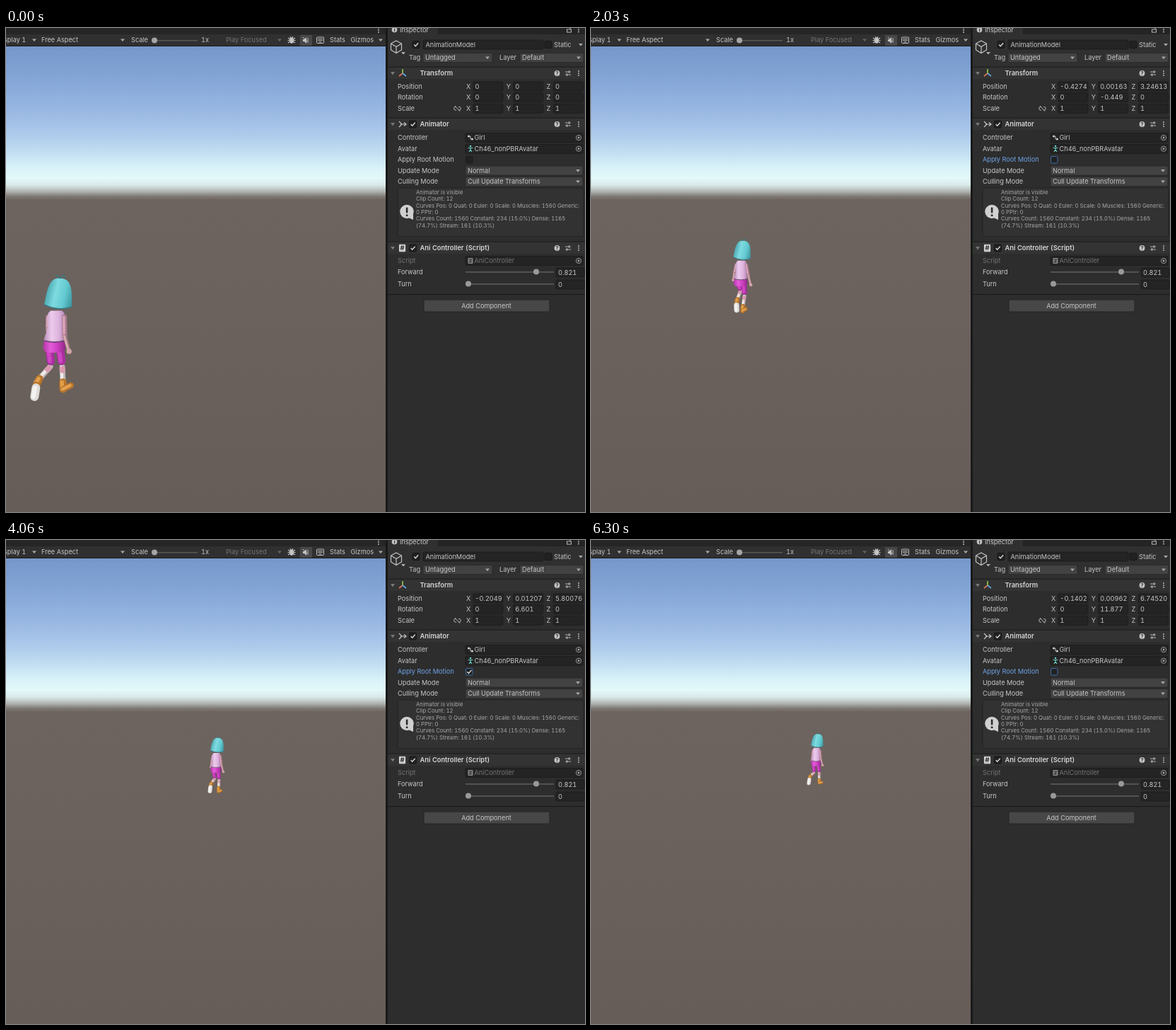
An HTML page with a canvas that plays this animation: 819 by 684 pixels, repeating every 6.37 s.

```html
<!DOCTYPE html>
<html lang="en">
<head>
<meta charset="utf-8">
<title>Root motion demo</title>
<style>
  html, body { margin: 0; width: 819px; height: 684px; overflow: hidden; background: #2d2d2d; }
  canvas, #ui { position: absolute; left: 0; top: 0; }
  canvas {
    background: linear-gradient(#6b635e 0, #6b635e 26px, #7597c9 26px, #83a5d6 70px, #98b7e2 115px, #adcaeb 150px,
      #c4e0f2 178px, #d9f2f8 197px, #e3f9fa 212px, #d9e8e8 222px, #b0b4b1 231px, #7f7975 238px, #6d645f 243px,
      #6b625d 400px, #665d58 684px);
  }
  text { font: 9.2px Inter, "Liberation Sans", sans-serif; font-variant-numeric: tabular-nums; fill: #c6c6c6; }
  .small { font-size: 7.75px; fill: #a9a9a9; }
  .bold { font-weight: 600; font-size: 9.3px; fill: #d6d6d6; }
  .dim { fill: #747474; }
</style>
</head>
<body>
<canvas width="538" height="684"></canvas>
<svg id="ui" width="819" height="684" viewBox="0 0 819 684"></svg>
<script>
const LOOP = 6370, STEP = 70;
const ui = document.getElementById('ui');

// ---------- editor interface ----------
const parts = [];
const add = (...s) => parts.push(...s);
const rect = (x, y, w, h, fill, extra = '') =>
  add(`<rect x="${x}" y="${y}" width="${w}" height="${h}" fill="${fill}" ${extra}/>`);
const path = (d, color = '#b8b8b8', w = 1, fill = 'none') =>
  add(`<path d="${d}" fill="${fill}" stroke="${color}" stroke-width="${w}"/>`);
const shape = (d, fill) => path(d, 'none', 0, fill);
const dot = (x, y, r, fill, extra = '') =>
  add(`<circle cx="${x}" cy="${y}" r="${r}" fill="${fill}" ${extra}/>`);
const text = (x, y, s, cls = '', extra = '') =>
  add(`<text x="${x}" y="${y + 3.3}" class="${cls}" ${extra}>${s}</text>`);
const arrow = (x, y, color = '#aaa') => shape(`M${x - 3} ${y - 1.5}h6l-3 3.5z`, color);
const more = (x, y) => [-3, 0, 3].forEach(d => dot(x, y + d, 0.9, '#c4c4c4'));
const tick = (x, y) => `M${x - 2.8} ${y}l2 2.3 4-4.6`;

function checkbox(x, y, on) {
  rect(x - 5, y - 5, 10, 10, '#212121', 'rx="1.5" stroke="#171717"');
  if (on) path(tick(x, y), '#d8d8d8', 1.4);
}
function box(x, y, w, h = 13) {
  rect(x, y - h / 2, w, h, '#242424', 'rx="1.5" stroke="#1b1b1b" stroke-width=".8"');
}
function field(x, y, w, id, value) {
  box(x, y, w);
  add(`<svg x="${x}" y="${y - 7}" width="${w - 1.5}" height="14"><text id="${id}" x="2.5" y="10.3">${value}</text></svg>`);
}
function dropdown(x, y, w, label) {
  rect(x, y - 6.5, w, 13, '#424242', 'rx="1.5" stroke="#272727" stroke-width=".8"');
  text(x + 3, y, label);
  arrow(x + w - 7, y);
}
function objectField(y, label, cls) {
  box(650, y, 166);
  text(662.5, y, label, cls);
  dot(810, y, 3.6, 'none', 'stroke="#a5a5a5" stroke-width=".9"');
  dot(810, y, 1.4, '#a5a5a5');
}
function header(y, title) {
  rect(540, y - 9, 279, 17, '#333');
  rect(540, y - 9.5, 279, 1, '#1b1b1b');
  shape(`M544 ${y - 2}h6l-3 4.5z`, '#777');
  text(585.5, y, title, 'bold');
  dot(779.5, y, 3.9, '#c4c4c4');
  add(`<text x="777.5" y="${y + 2.6}" style="font-size:7px;font-weight:700;fill:#333">?</text>`);
  path(`M791 ${y - 2}h8M791 ${y + 2}h8M796.5 ${y - 4}v4M793.5 ${y}v4`);
  more(810, y);
}
function slider(y, knob, value) {
  rect(650, y - 0.9, 125, 1.6, '#5c5c5c');
  dot(knob, y - 0.5, 4, '#999');
  box(778, y + 0.5, 40);
  text(781, y + 0.5, value);
}
function scriptIcon(x, y, r, color) {
  rect(x - r, y - r * 1.15, r * 2, r * 2.3, color, 'rx="1"');
  add(`<text x="${x - r * .65}" y="${y + r * .75}" style="font-size:${r * 2}px;font-weight:700;fill:#303030">#</text>`);
}

function toolbar() {
  rect(0, 0, 538, 26, '#303030');
  rect(0, 0, 538, 9, '#262626');
  rect(0, 25, 538, 1, '#1c1c1c');
  more(527, 3);
  text(-3, 17, 'splay 1'); arrow(40, 17);
  text(50, 17, 'Free Aspect'); arrow(165, 17);
  text(177, 17, 'Scale');
  rect(206, 17, 65, 1.3, '#5c5c5c'); dot(210, 17.5, 4, '#a5a5a5');
  text(276, 17, '1x');
  text(311, 17, 'Play Focused', 'dim'); arrow(387, 17, '#666');
  add('<ellipse cx="404" cy="17.5" rx="3" ry="4.3" fill="#c4c4c4"/>');
  path('M399 14l10 7M409 14l-10 7M398.5 17.5h11M402 12l1 2M406 12l-1 2', '#c4c4c4', 1.1);
  rect(416, 10, 17, 15, '#484848');
  shape('M420 16h2l3-3v9l-3-3h-2z', '#c4c4c4');
  path('M420 13l8 8M427 14v5', '#c4c4c4');
  rect(439.5, 13, 10, 8.5, 'none', 'stroke="#c4c4c4" rx="1"');
  path('M441 15.5h7M441 17.5h7M442.5 19.7h4', '#c4c4c4', 0.9);
  text(458, 17, 'Stats');
  text(487.5, 17, 'Gizmos'); arrow(530, 17);
}

function inspector() {
  rect(538, 0, 281, 684, '#2d2d2d');
  rect(537, 0, 3, 684, '#191919');
  rect(540, 0, 279, 9, '#242424');
  rect(540, 0, 71, 55, '#303030');
  rect(540, 9, 279, 46, '#303030');
  dot(549.5, 2.5, 3.8, '#c4c4c4'); rect(549, 1, 1.2, 4, '#333');
  text(557, 2.5, 'Inspector');
  rect(793.5, 2, 6, 4, 'none', 'stroke="#b8b8b8"'); path('M798 2v-3');
  more(810, 2.5);

  path('M552 18l7.5 4v9l-7.5 4.5-7.5-4.5v-9zM544.5 22l7.5 4.5 7.5-4.5M552 26.5v9', '#c4c4c4', 1.2);
  arrow(562, 35.5);
  checkbox(580, 23.5, true);
  box(590, 23.5, 170); text(593.5, 23.5, 'AnimationModel');
  checkbox(767, 23.5, false); text(775, 23.5, 'Static'); arrow(813, 23.5);
  text(570, 42, 'Tag'); dropdown(590, 42, 98, 'Untagged');
  text(698, 42, 'Layer'); dropdown(727, 42, 90, 'Default');

  header(64, 'Transform');
  path('M561 64v-6', '#8fc84a', 1.7); path('M561 64l-5 4', '#e0745a', 1.7); path('M561 64l5 4', '#5aa9dd', 1.7);
  ['Position', 'Rotation', 'Scale'].forEach((name, row) => {
    const y = 82.5 + row * 15.6;
    text(554, y, name);
    ['X', 'Y', 'Z'].forEach((axis, col) => {
      const x = 661 + col * 56.7;
      text(x - 10, y, axis);
      field(x, y, 42, name[0] + axis, row < 2 ? 0 : 1);
    });
  });
  path('M637 111.5h-1a2.3 2.3 0 0 0 0 4.6h1M640 111.5h1a2.3 2.3 0 0 1 0 4.6h-1M635 110l7 7.5');

  header(136, 'Animator');
  path('M556 132l4 4-4 4M558 136h7M563 133.5l3 2.5-3 2.5', '#c4c4c4', 1.2);
  checkbox(575.5, 136, true);
  text(554, 155, 'Controller'); objectField(155, 'Girl');
  path('M654 153h3v4h3', '#bbb'); dot(654.5, 153, 1.5, '#ccc'); dot(659.5, 157, 1.5, '#ccc');
  text(554, 170.7, 'Avatar'); objectField(170.7, 'Ch46_nonPBRAvatar');
  dot(657, 167, 1.3, '#6cd0c4'); path('M653.5 169.5h7M657 169v3l-2 3M657 172l2 3', '#6cd0c4', 1.2);
  text(554, 186, 'Apply Root Motion', '', 'id="label"');
  rect(650.5, 181.5, 9.5, 9.5, '#222', 'rx="1.5" stroke="#1b1b1b" id="toggle"');
  add(`<path id="tick" d="${tick(655.2, 186.2)}" fill="none" stroke="#dedede" stroke-width="1.4"/>`);
  text(554, 201.5, 'Update Mode'); dropdown(650, 201.5, 166, 'Normal');
  text(554, 217, 'Culling Mode'); dropdown(650, 217, 166, 'Cull Update Transforms');

  rect(554, 226, 263, 68.5, '#323232', 'rx="2" stroke="#222"');
  dot(567, 259.5, 9.7, '#d0d0d0'); shape('M569 268l7-5v8z', '#d0d0d0');
  rect(565.8, 253.5, 2.6, 8, '#2d2d2d', 'rx="1"'); dot(567.1, 264.8, 1.5, '#2d2d2d');
  ['Animator is visible', 'Clip Count: 12',
   'Curves Pos: 0 Quat: 0 Euler: 0 Scale: 0 Muscles: 1560 Generic:', '0 PPtr: 0',
   'Curves Count: 1560 Constant: 234 (15.0%) Dense: 1165', '(74.7%) Stream: 161 (10.3%)'
  ].forEach((line, i) => text(580, 231.7 + i * 9.35, line, 'small'));

  header(311, 'Ani Controller (Script)');
  scriptIcon(560.5, 311, 4.6, '#d0d0d0');
  checkbox(575.5, 311, true);
  text(554, 329, 'Script', 'dim'); objectField(329, 'AniController', 'dim');
  scriptIcon(657, 329, 3.5, '#858585');
  text(554, 345, 'Forward'); slider(345, 750, '0.821');
  text(554, 362, 'Turn'); slider(362, 654, '0');
  rect(540, 376, 279, 1.2, '#1b1b1b');
  rect(591, 384, 178, 17, '#474747', 'rx="2" stroke="#242424"');
  text(679.5, 392.5, 'Add Component', '', 'text-anchor="middle"');
}

toolbar();
inspector();
ui.innerHTML = parts.join('');
const $ = id => document.getElementById(id);

// ---------- motion ----------
// time, x, y, z, heading
const track = [
  [140, 0, 0, 0, 0],
  [840, -0.24461, 0.008312, 1.766199, -2.553],
  [1560, -0.42743, 0.001632, 3.246132, -0.449],
  [2815, -0.42743, 0.001632, 3.246132, -0.449],
  [2940, -0.41852, 0.013231, 3.500231, 9.17],
  [4060, -0.20493, 0.012071, 5.800761, 6.601],
  [4520, -0.14027, 0.009621, 6.745202, 11.877]
];
// time, run cycles completed
const strides = [[0, 0], [840, 1.05], [2030, 3.13], [2940, 4.73], [4060, 6.05], [4970, 7.82], [6300, 10]];

function sample(keys, t) {
  let i = 0;
  while (i < keys.length - 2 && t > keys[i + 1][0]) i++;
  const a = keys[i], b = keys[i + 1];
  const u = Math.min(1, Math.max(0, (t - a[0]) / (b[0] - a[0])));
  return a.slice(1).map((v, k) => v + (b[k + 1] - v) * u);
}

// closed Catmull-Rom curve through evenly spaced values
function cycle(v, p) {
  const n = v.length, f = (p - Math.floor(p)) * n, i = Math.floor(f), u = f - i;
  const [a, b, c, d] = [-1, 0, 1, 2].map(k => v[(i + k + n) % n]);
  return b + u / 2 * (c - a + u * (2 * a - 5 * b + 4 * c - d + u * (3 * (b - c) + d - a)));
}
const ankleZ = [-33, -13, 12, 24, -1, -14, -27, -39];
const ankleY = [30, 24, 18, 12, 8, 8, 9, 18];
const footPitch = [-100, -78, -30, 5, -5, 0, -22, -65];

// ---------- runner ----------
const ctx = document.querySelector('canvas').getContext('2d');
ctx.lineCap = ctx.lineJoin = 'round';

function runner(x, z, heading, phase) {
  const s = 5.34 / (5.34 + z);
  const rootX = 528 + s * (120 * x - 454), rootY = 211 + 303 * s;
  const fx = 0.71 * s + Math.sin(heading * Math.PI / 180), fy = 0.49 * s;
  const bob = 1.5 * Math.cos(4 * Math.PI * phase);
  const at = (px, py, pz) => [rootX + s * (px + fx * pz), rootY - s * (py + fy * pz)];
  const mix = (a, b, u) => a.map((v, i) => v + (b[i] - v) * u);

  function line(a, b, w, color) {
    ctx.strokeStyle = color;
    ctx.lineWidth = w * s;
    ctx.beginPath(); ctx.moveTo(...a); ctx.lineTo(...b); ctx.stroke();
  }
  function limb(a, b, w, dark, light) {
    line(a, b, w, dark);
    const shift = ([u, v]) => [u - w * s * 0.12, v];
    line(shift(a), shift(b), w * 0.5, light);
  }
  function across(c, half, ...stops) {
    const g = ctx.createLinearGradient(c[0] - half * s, 0, c[0] + half * s, 0);
    stops.forEach((color, i) => g.addColorStop(i / (stops.length - 1), color));
    return g;
  }

  function leg(side, p) {
    const az = cycle(ankleZ, p), ay = cycle(ankleY, p), hx = 7.5 * side, hy = 66 + bob, hz = -8;
    const dist = Math.min(59.9, Math.hypot(az - hz, ay - hy));
    const bend = Math.acos((29 * 29 + dist * dist - 31 * 31) / (58 * dist));
    const ang = Math.atan2(ay - hy, az - hz) + bend;
    const hip = at(hx, hy, hz), ankle = at(hx, ay, az);
    const knee = at(hx, hy + 29 * Math.sin(ang), hz + 29 * Math.cos(ang));
    const deg = cycle(footPitch, p), r = deg * Math.PI / 180;
    const toe = at(hx + side, ay - 4 + 16 * Math.sin(r), az + 14 * Math.cos(r));
    const heel = at(hx, ay - 4, az);
    limb(mix(knee, ankle, 0.08), ankle, 8, '#bdb5b3', '#f1eeec');
    line(mix(knee, ankle, 0.18), mix(knee, ankle, 0.24), 8, '#d99ab0');
    limb(hip, mix(hip, knee, 0.78), 11.5, '#a82f9e', '#cf45c3');
    limb(mix(knee, ankle, 0.8), heel, 10.5, '#b8742c', '#e0a04c');
    limb(heel, toe, 8.5, '#b8742c', '#e2a250');
    const sole = Math.min(1, Math.max(0, (-deg - 50) / 25));
    if (sole) {
      ctx.globalAlpha = sole;
      limb(mix(heel, toe, 0.25), toe, 12, '#dedbd8', '#f3f2f0');
      ctx.globalAlpha = 1;
    }
  }

  const swing = 10 * Math.cos(2 * Math.PI * phase);
  function arm(side) {
    const z0 = -side * swing;
    const shoulder = at(11.5 * side, 106 + bob, -4);
    const elbow = at(19 * side, 84 + bob, z0 - 4);
    const hand = at(23 * side, 61 + bob + Math.max(0, z0), z0 * 1.1);
    limb(shoulder, elbow, 7, '#a9788c', '#d6a6b8');
    limb(elbow, hand, 5.5, '#a77b85', '#d9adb3');
    line(hand, hand, 7.5, '#d0a3a8');
  }

  const sides = [{ side: -1, p: phase }, { side: 1, p: phase + 0.5 }];
  sides.sort((a, b) => cycle(ankleZ, b.p) - cycle(ankleZ, a.p)).forEach(l => leg(l.side, l.p));
  const farArm = swing > 0 ? -1 : 1;
  arm(farArm);

  const waist = at(0, 75 + bob, -8), chest = at(0, 111 + bob, -4);
  const hips = at(0, 63 + bob, -8);
  ctx.fillStyle = across(hips, 16, '#b136a7', '#e35bd8', '#c93dbd', '#8e2884');
  ctx.beginPath();
  ctx.moveTo(waist[0] - 14 * s, waist[1]);
  ctx.quadraticCurveTo(hips[0] - 18 * s, hips[1], hips[0] - 13 * s, hips[1] + 4 * s);
  ctx.quadraticCurveTo(hips[0], hips[1] + 7 * s, hips[0] + 13 * s, hips[1] + 4 * s);
  ctx.quadraticCurveTo(hips[0] + 18 * s, hips[1], waist[0] + 14 * s, waist[1]);
  ctx.fill();

  ctx.fillStyle = across(mix(waist, chest, 0.5), 16, '#b98dbc', '#edcbed', '#dcb2dd', '#a677a9');
  ctx.beginPath();
  ctx.moveTo(chest[0] - 8 * s, chest[1] - 4 * s);
  ctx.quadraticCurveTo(chest[0] - 15 * s, chest[1], chest[0] - 12 * s, chest[1] + 14 * s);
  ctx.quadraticCurveTo(chest[0] - 12 * s, waist[1] - 12 * s, waist[0] - 15.5 * s, waist[1]);
  ctx.quadraticCurveTo(waist[0], waist[1] + 5 * s, waist[0] + 15.5 * s, waist[1]);
  ctx.quadraticCurveTo(chest[0] + 11 * s, waist[1] - 12 * s, chest[0] + 12 * s, chest[1] + 14 * s);
  ctx.quadraticCurveTo(chest[0] + 15 * s, chest[1], chest[0] + 8 * s, chest[1] - 4 * s);
  ctx.fill();
  ctx.strokeStyle = '#6d4a6d';
  ctx.lineWidth = 1.6 * s;
  ctx.beginPath();
  ctx.moveTo(waist[0] - 15 * s, waist[1]);
  ctx.quadraticCurveTo(waist[0], waist[1] + 5 * s, waist[0] + 15 * s, waist[1]);
  ctx.stroke();
  arm(-farArm);

  const head = at(0, 119 + bob, 0);
  ctx.save();
  ctx.translate(...head);
  ctx.scale(s, s);
  ctx.rotate(0.08);
  const g = ctx.createLinearGradient(-20, -12, 20, -6);
  ['#4ba7af', '#7edbe0', '#63c9d0', '#3a929c'].forEach((c, i) => g.addColorStop(i / 3, c));
  ctx.fillStyle = g;
  ctx.beginPath();
  ctx.moveTo(-20, -1);
  ctx.bezierCurveTo(-18, -18, -17, -39, -3, -40);
  ctx.bezierCurveTo(13, -41, 18, -33, 19, -1);
  ctx.quadraticCurveTo(0, 7, -20, -1);
  ctx.fill();
  ctx.strokeStyle = '#347b84';
  ctx.lineWidth = 1.4;
  ctx.beginPath();
  ctx.moveTo(-20, -1); ctx.quadraticCurveTo(0, 7, 19, -1);
  ctx.moveTo(-2, -40); ctx.lineTo(-7, -44);
  ctx.moveTo(-1, -40); ctx.quadraticCurveTo(2, -47, 7, -42);
  ctx.stroke();
  ctx.restore();
}

function show(id, value) {
  if ($(id).textContent !== value) $(id).textContent = value;
}

function frame() {
  const now = performance.now() % LOOP;
  const t = now < 210 ? 0 : Math.floor(now / STEP) * STEP;
  const [x, y, z, heading] = sample(track, t);
  const on = (t > 140 && t < 1560) || (t > 2815 && t < 4520);
  const pos = v => v ? v.toFixed(6) : '0';
  show('PX', pos(x)); show('PY', pos(y)); show('PZ', pos(z));
  show('RY', String(+heading.toFixed(3)));
  $('label').style.fill = t ? '#6fa3e6' : '';
  $('toggle').setAttribute('stroke', t ? '#3d6ea8' : '#1b1b1b');
  $('tick').style.display = on ? '' : 'none';
  ctx.clearRect(0, 0, 538, 684);
  runner(x, z, heading, sample(strides, t)[0]);
  requestAnimationFrame(frame);
}
frame();
</script>
</body>
</html>
```
